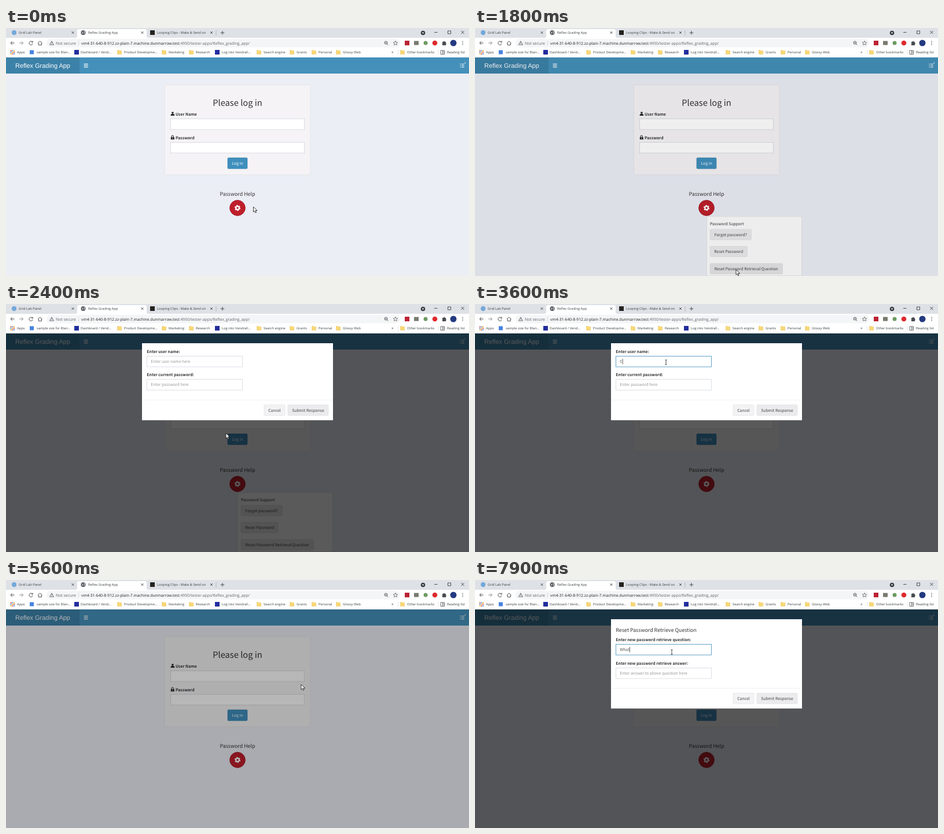
Animation of 800x430 px, one loop 8 s. Source, as an HTML page:

```html
<!DOCTYPE html>
<html lang="en">
<head>
<meta charset="utf-8">
<title>Login demo</title>
<style>
  html, body { margin: 0; width: 100%; height: 100%; overflow: hidden; background: #ecf0f5; }
  svg { display: block; width: 800px; height: 430px; }
  text { white-space: pre; text-rendering: geometricPrecision; }
  .ui { font-family: "Open Sans", "Noto Sans", sans-serif; }
  .app { font-family: "Noto Sans CJK JP", "Noto Sans CJK SC", "Noto Sans CJK", "Noto Sans", sans-serif; }
  .brand { font-family: "Liberation Sans", sans-serif; }
  .line { fill: none; stroke: #4a4d51; stroke-width: 1; }
</style>
</head>
<body>
<svg id="stage" viewBox="0 0 800 430"></svg>
<script>
const LOOP = 8000;
const BODY = 6.86, LEAD = 8.85, TITLE = 14.7;

// Markup helpers
const rect = (x, y, w, h, fill, more = '') =>
  `<rect x="${x}" y="${y}" width="${w}" height="${h}" fill="${fill}" ${more}/>`;
const disc = (x, y, r, fill, more = '') =>
  `<circle cx="${x}" cy="${y}" r="${r}" fill="${fill}" ${more}/>`;
const line = (d, more = '') => `<path class="line" d="${d}" ${more}/>`;
const text = (cls, x, y, size, fill, str, more = '') =>
  `<text class="${cls}" x="${x}" y="${y}" font-size="${size}" fill="${fill}" ${more}>${str}</text>`;
const ui = (x, y, str, size = 5.75, fill = '#3c4043') => text('ui', x, y, size, fill, str);
const app = (x, y, str, size = BODY, fill = '#333', more = '') => text('app', x, y, size, fill, str, more);
const MID = 'text-anchor="middle"', BOLD = 'font-weight="700"';
const button = (x, y, w, h, str, fill, id = '') =>
  rect(x, y, w, h, fill, `rx="1.6" stroke="#dcdcdf" stroke-width=".6" ${id && `id="${id}"`}`) +
  app(x + w / 2, y + h / 2 + 2.5, str, BODY, '#444', MID);

// Browser window
const cross = (x, y, r, more) => line(`M${x - r} ${y - r}l${2 * r} ${2 * r}M${x + r} ${y - r}l${-2 * r} ${2 * r}`, more);
const folder = x => `<path d="M${x - 3.5} 38.5h2.6l1 1h3.6v6h-7.2z" fill="#f8d775" stroke="#e3b94c" stroke-width=".4"/>`;

function tabStrip() {
  return rect(0, 0, 800, 17, '#dee1e6') +
    '<path d="M120 17q3 0 3-3V5q0-3 3-3h114q3 0 3 3v9q0 3 3 3z" fill="#fff"/>' +
    disc(14, 8, 4.2, '#74a8da') + ui(22, 10.3, 'Grid Lab Panel') +
    disc(133.5, 8, 4, '#50545a') + line('M131 6.5l2 1.5-1 2M134.5 5l1.5 2-1 1.5 1 1.5', 'style="stroke:#fff"') +
    ui(142, 10.3, 'Reflex Grading App') +
    rect(249, 4, 8, 8, '#24211f') + ui(261, 10.3, 'Looping Clips - Make &amp; Send on') +
    [115.5, 235.5, 355].map(x => cross(x, 8, 1.9, 'stroke-width=".8"')).join('') +
    line('M363 4v9', 'style="stroke:#9a9da2;stroke-width:.6"') + line('M374 5v6.4M370.8 8.2h6.4') +
    disc(720.5, 8.5, 3.8, '#3a3d41') + '<path d="M718.7 7.5h3.6l-1.8 2.4z" fill="#fff"/>' +
    line('M740 7.5h5.5') + line('M763.5 5h5v5h-5z') + cross(789, 7.5, 2.6);
}

function toolbar() {
  const host = 'vm4-31-640-8-912.zz-plain-7.machine.dunmarrow.test';
  const path = ':4950/tester-apps/Reflex_grading_app/';
  return rect(0, 17, 800, 34, '#fff') +
    rect(70, 18.7, 611, 14.8, '#f4f5f6', 'rx="7.4"') +
    line('M14.5 26h-6.5M11 23l-3 3 3 3') +
    line('M23 26h6.5M26.500 23l3 3-3 3', 'opacity=".6"') +
    line('M45.500 24a3.200 3.200 0 1 0 .7 3M46.300 22.500v2.300h-2.300') +
    line('M55 26.300l3.800-3.500 3.800 3.500M56.200 25.800v3.700h5.200v-3.700') +
    line('M79 22.800l3.600 6.200h-7.200zM79 25v1.800M79 27.500v.7', 'style="stroke-width:.8"') +
    ui(86, 28.500, 'Not secure', 6.9, '#5f6368') + line('M125.500 22v8', 'style="stroke:#c4c7ca;stroke-width:.6"') +
    ui(130, 28.500, `${host}<tspan fill="#5f6368">${path}</tspan>`, 6.75, '#202124') +
    '<circle class="line" cx="656.500" cy="25.500" r="2.400"/>' + line('M658.300 27.300l2 2M655.500 25.500h2') +
    line('M673 22.300l1.100 2.500 2.700.2-2.100 1.800.7 2.600-2.400-1.400-2.400 1.400.7-2.600-2.100-1.800 2.700-.2z', 'style="stroke-width:.7"') +
    rect(689, 22, 8, 8, '#bb2434') + rect(705, 22.500, 8, 7, '#777a6e') + disc(725, 26, 3.500, '#6c9b62') +
    disc(741, 26, 4.300, '#df2a2e') +
    '<path d="M754 24h1.800a1.300 1.300 0 0 1 2.600 0h1.600v2a1.300 1.300 0 0 1 0 2.400v1.600h-6z" fill="#4a4d51"/>' +
    disc(773, 26, 5.500, '#243a80') +
    [23.200, 26, 28.800].map(y => disc(789, y, .8, '#4a4d51')).join('');
}

function bookmarks() {
  const labels = [
    [19, 'Apps'], [53, 'sample size for Blan...'], [129, 'Dashboard / Vend...'], [204, 'Product Developme...'],
    [281, 'Marketing'], [328, 'Research'], [373, 'Log into Vendrall...'], [445, 'Search engine'],
    [502, 'Grants'], [540, 'Personal'], [582, 'Glossy Web'], [693, 'Other bookmarks'], [762, 'Reading list']
  ];
  const dots = ['#d9483b', '#4a86e0', '#e8ae2c'];
  let out = labels.map(([x, s]) => ui(x, 44.100, s)).join('');
  for (let i = 0; i < 9; i++)
    out += rect(7.500 + i % 3 * 2.700, 38.500 + Math.floor(i / 3) * 2.700, 1.900, 1.900, dots[(i + Math.floor(i / 3)) % 3]);
  return out + rect(41, 38.500, 7, 7, '#4683df') + [118, 361].map(x => rect(x, 38, 8, 8, '#232f9d')).join('') +
    [196, 273, 320, 437, 494, 532, 574, 685].map(folder).join('') +
    ui(666, 44.100, '»', 7) + line('M677.500 38v8M747 38v8', 'style="stroke:#cfd2d6;stroke-width:.6"') +
    line('M751 39h6.500v6.500h-6.500zM754.300 39v6.500M755.300 41h1.500M755.300 43h1.500', 'style="stroke-width:.8"');
}

// Web page
function page() {
  const gear = disc(400, 312, 13.400, '#be1f2b', 'stroke="#a01822" stroke-width=".8"') +
    disc(400, 312, 2.900, 'none', 'stroke="#fff" stroke-width="2.200"') +
    disc(400, 312, 4.300, 'none', 'stroke="#fff" stroke-width="1.700" stroke-dasharray="2.300 2.203"');
  const box = y => rect(284.500, y, 231, 18.500, '#fff', 'stroke="#d2d6de" stroke-width=".8"');
  return rect(0, 51, 800, 379, '#ebeef5') + rect(0, 51, 800, 28, '#4490ba') + rect(0, 51, 127, 28, '#3c81a8') +
    text('brand', 63.500, 69, 10.94, '#fff', 'Reflex Grading App', MID) +
    [62.500, 65.200, 67.900].map(y => rect(134.600, y - .6, 7, 1.200, '#fff') +
      rect(787, y - .5, 4.800, 1, '#fff') + rect(784.500, y - .5, 1.400, 1, '#fff')).join('') +
    text('brand', 792, 61.500, 4.500, '#fff', '4') +
    rect(274.300, 98.800, 251.700, 155.700, '#f5f3f5', 'rx="1.600" stroke="#e2e1e3" stroke-width=".7"') +
    app(400, 134.700, 'Please log in', TITLE, '#333', MID) +
    disc(287.900, 147, 1.800, '#222') + '<path d="M284.500 152q0-3 2.300-3h2.200q2.300 0 2.300 3z" fill="#222"/>' +
    app(293, 151.600, 'User Name', BODY, '#333', BOLD) + box(157.500) +
    rect(284.800, 189.300, 6, 4, '#222', 'rx=".6"') + line('M286 189.500v-1.500a1.700 1.700 0 0 1 3.400 0v1.500', 'style="stroke:#222"') +
    rect(287.300, 190.500, 1, 1.600, '#fff') +
    app(293, 192.500, 'Password', BODY, '#333', BOLD) + box(198.300) +
    rect(383, 225, 34, 19, '#3f8fbd', 'rx="1.600" stroke="#367fa9" stroke-width=".6"') +
    app(400, 237.200, 'Log in', BODY, '#fff', MID) +
    app(400, 291, 'Password Help', LEAD, '#333', MID) + gear +
    `<g id="menu">${rect(400.700, 327, 163.600, 102.700, '#fdfdfe', 'stroke="#dcdde2" stroke-width=".6"')}` +
    app(406, 341.500, 'Password Support') +
    button(406, 349, 71.500, 18.300, 'Forgot password?', '#ebebee') +
    button(406, 378.500, 64.500, 18.300, 'Reset Password', '#ebebee') +
    button(406, 408.200, 125.500, 18.300, 'Reset Password Retrieval Question', '#ebebee', 'choice') + '</g>' +
    `<g id="backdrop">${rect(0, 51, 800, 379, '#000')}</g>`;
}

// Dialogs; `typed` lists [time, value so far]
const fields = [
  { id: 'user', y: 90.5, hint: 'Enter user name here', focus: [3000, 4200], typed: [[3600, 'C']] },
  { id: 'pass', y: 130.7, hint: 'Enter password here', focus: [4200, 5500], typed: [[4500, 'D']] },
  { id: 'question', y: 111.5, hint: 'Enter new question here', focus: [7000, LOOP],
    typed: [[7500, 'W'], [7700, 'Wha'], [7900, 'What']] },
  { id: 'answer', y: 152.4, hint: 'Enter answer to above question here', focus: [LOOP, LOOP], typed: [] }
];
const dialogs = [
  { id: 'login', opens: 1934, closes: 5330, height: 133.5, fields: fields.slice(0, 2),
    labels: ['Enter user name:', 'Enter current password:'], title: '' },
  { id: 'retrieve', opens: 5668, closes: LOOP + 200, height: 154.8, fields: fields.slice(2),
    labels: ['Enter new password retrieve question:', 'Enter new password retrieve answer:'],
    title: 'Reset Password Retrieve Question' }
];

function dialog(d) {
  const foot = 68 + d.height;
  const inputs = d.fields.map((f, i) =>
    app(243.300, f.y - 5.600, d.labels[i], BODY, '#333', BOLD) +
    rect(243.500, f.y, 165, 18.500, '#fff', `id="${f.id}Box" stroke-width=".8"`) +
    app(250.200, f.y + 11.700, '', BODY, '#555', `id="${f.id}"`) +
    rect(0, f.y + 4.500, .7, 9.500, '#222', `id="${f.id}Caret"`)).join('');
  return `<g id="${d.id}">${rect(0, 51, 800, 379, '#000', 'opacity=".29"')}<g id="${d.id}Panel">` +
    rect(235, 68, 330, d.height, '#fff') + app(243.300, 90.200, d.title, LEAD) + inputs +
    rect(235, foot - 35.300, 330, .7, '#ececee') +
    button(446, foot - 26.700, 36, 18.500, 'Cancel', '#f3f3f5') +
    button(487, foot - 26.700, 70, 18.500, 'Submit Response', '#ebebed', d.id + 'Submit') + '</g></g>';
}

const cursor = '<g id="cursor"><path id="arrow" d="M0 0v9l2.100-1.900 1.500 3.300 1.500-.7-1.500-3.200h2.900z" ' +
  'fill="#fff" stroke="#111" stroke-width=".8"/>' +
  '<path id="beam" class="line" style="stroke:#222;stroke-width:.8" d="M-1.600-4h3.200M-1.600 4h3.200M0-4v8"/></g>';

document.getElementById('stage').innerHTML =
  page() + dialogs.map(dialog).join('') + tabStrip() + toolbar() + bookmarks() + cursor;

// Motion
const track = [
  [0, 427.5, 310], [100, 427.5, 310], [400, 404, 313], [700, 404, 313], [1000, 413, 338], [1600, 451, 419],
  [2000, 451, 419], [2400, 380, 224], [2800, 330, 101], [3800, 330, 101], [4200, 330, 143], [4500, 330, 143],
  [4800, 441, 157], [5200, 510, 181], [6300, 510, 181], [6900, 340, 125], [LOOP, 340, 125]
];
const $ = id => document.getElementById(id);
const set = (id, attrs) => { for (const k in attrs) $(id).setAttribute(k, attrs[k]); };
const show = (id, on) => set(id, { visibility: on ? 'visible' : 'hidden' });
const ramp = (t, start, length) => Math.min(1, Math.max(0, (t - start) / length));
const easeOut = p => 1 - (1 - p) ** 1.66;

function pointerAt(t) {
  const i = track.findIndex(k => k[0] > t);
  const [t0, x0, y0] = track[i - 1], [t1, x1, y1] = track[i];
  const p = (t - t0) / (t1 - t0), e = p * p * (3 - 2 * p);
  return [x0 + (x1 - x0) * e, y0 + (y1 - y0) * e];
}

function drawField(f, t) {
  const focused = t >= f.focus[0] && t < f.focus[1];
  const value = f.typed.reduce((v, [at, s]) => t >= at ? s : v, '');
  const node = $(f.id), str = value || f.hint;
  if (node.textContent !== str) node.textContent = str;
  set(f.id, { fill: value ? '#555' : '#999' });
  set(f.id + 'Box', { stroke: focused ? '#3c8dbc' : '#d2d6de' });
  set(f.id + 'Caret', {
    x: 250.2 + (value ? node.getComputedTextLength() + .2 : 0),
    opacity: focused ? 1 : 0
  });
}

function backdropAt(t) {
  if (t >= 5516) return .5 * ramp(t, 5516, 150);
  return .5 * (ramp(t, 1782, 150) - ramp(t, 5480, 150));
}

function render(t) {
  const [x, y] = pointerAt(t);
  let beam = false;
  show('menu', t >= 500 && t < 3000);
  set('choice', { fill: t < 2000 && y > 408 ? '#e4e4e7' : '#ebebee' });
  set('backdrop', { opacity: backdropAt(t) });
  for (const d of dialogs) {
    const alpha = ramp(t, d.opens, 150) - ramp(t, d.closes, 150);
    const slide = easeOut(ramp(t, d.opens, 300)) - easeOut(ramp(t, d.closes, 300));
    const foot = 68 + d.height;
    const over = x > 487 && x < 557 && y > foot - 34 && y < foot - 8;
    set(d.id, { opacity: alpha });
    set(d.id + 'Panel', { transform: `translate(0 ${-d.height / 4 * (1 - slide)})` });
    set(d.id + 'Submit', { fill: over ? '#e4e4e6' : '#ebebed' });
    d.fields.forEach(f => {
      drawField(f, t);
      beam = beam || alpha === 1 && x > 243 && x < 409 && y > f.y && y < f.y + 18.5;
    });
  }
  set('cursor', { transform: `translate(${x} ${y})` });
  show('arrow', !beam);
  show('beam', beam);
}

const start = performance.now();
function tick() {
  render((performance.now() - start) % LOOP);
  requestAnimationFrame(tick);
}
tick();
</script>
</body>
</html>
```
